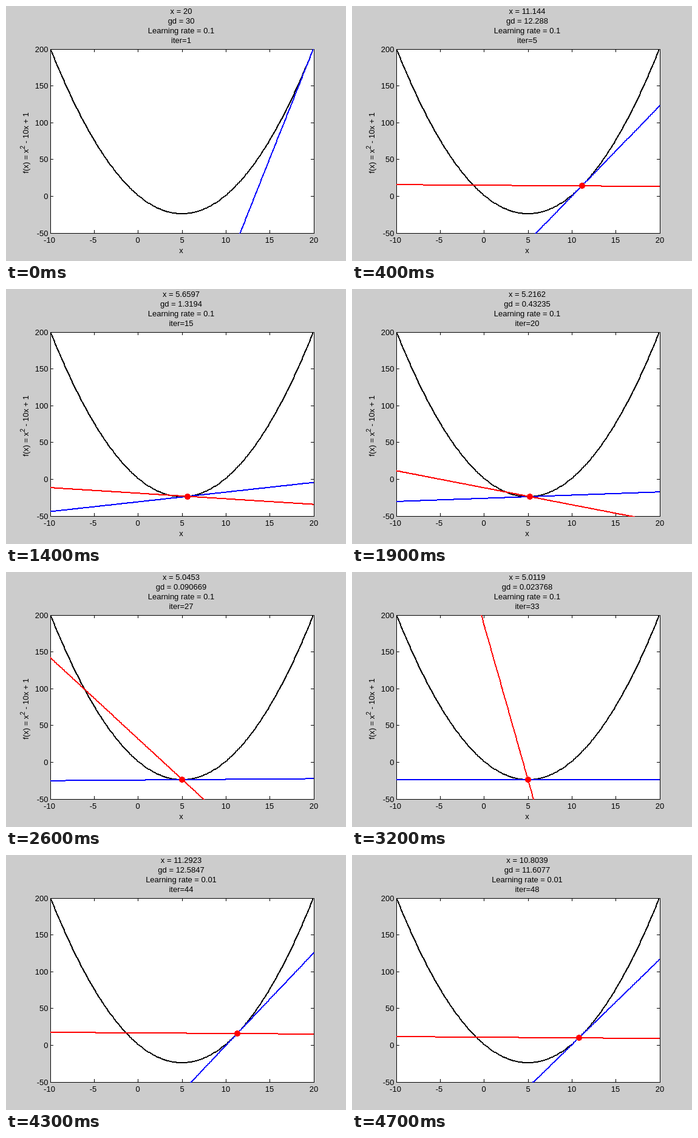
An HTML page for the animation above (4.8 s loop, 560 px wide and 420 px high).

```html
<!DOCTYPE html>
<html lang="en">
<head>
<meta charset="utf-8">
<title>Gradient descent</title>
<style>
  html, body { margin: 0; width: 100%; height: 100%; overflow: hidden; background: #ccc; }
  svg { display: block; width: 560px; height: 420px; }
  text { font: 13px "Liberation Sans", Arial, sans-serif; fill: #000; }
  .mid { text-anchor: middle; }
  .end { text-anchor: end; }
  .sup { font-size: 10.4px; }
  .axes { stroke: #000; stroke-width: 1; fill: none; shape-rendering: crispEdges; }
  .plot { fill: none; stroke-width: 2; stroke-linejoin: round; shape-rendering: crispEdges; }
</style>
</head>
<body>
<svg viewBox="0 0 560 420">
  <defs><clipPath id="area"><rect x="73" y="71" width="435" height="304"/></clipPath></defs>
  <rect width="560" height="420" fill="#ccc"/>
  <rect x="73" y="71" width="435" height="304" fill="#fff"/>
  <path id="axes" class="axes"/>
  <g id="ticks"></g>
  <g id="names">
    <text class="mid" x="288.5" y="407">x</text>
    <text class="mid" transform="translate(37 225.5) rotate(-90)">f(x) = x<tspan class="sup" dy="-6">2</tspan><tspan dy="6"> - 10x + 1</tspan></text>
  </g>
  <g id="title"></g>
  <g class="plot" clip-path="url(#area)">
    <polyline id="curve" stroke="#000"/>
    <polyline id="tangent" stroke="#00f"/>
    <polyline id="normal" stroke="#f00"/>
    <circle id="dot" r="5" fill="#f00"/>
  </g>
</svg>
<script>
const STEP_MS = 100, STEPS = 48, FIRST_RUN = 43, START = 20;
const LEFT = 72.8, RIGHT = 506.8, TOP = 70.55, BOTTOM = 373.55, TICK = 4.34;
const $ = id => document.getElementById(id);

// Everything in the plot lands on whole pixels.
const px = x => Math.round(LEFT + (x + 10) * (RIGHT - LEFT) / 30);
const py = y => Math.round(BOTTOM - (y + 50) * (BOTTOM - TOP) / 250);
const f = x => x * x - 10 * x + 1;

function addText(parent, cls, x, y, value = '') {
  const el = document.createElementNS('http://www.w3.org/2000/svg', 'text');
  el.setAttribute('class', cls);
  el.setAttribute('x', x);
  el.setAttribute('y', y);
  el.textContent = value;
  parent.append(el);
  return el;
}

function plot(el, fn) {
  const pts = [];
  for (let i = 0; i <= 300; i++) {
    const x = -10 + i / 10;
    pts.push(px(x) + ',' + py(fn(x)));
  }
  el.setAttribute('points', pts.join(' '));
}

function drawAxes() {
  const [l, r, t, b] = [px(-10), px(20), py(200), py(-50)];
  const near = v => Math.round(v + TICK) + 1;
  const far = v => Math.round(v - TICK);
  let d = `M${l + .5} ${t + .5}H${r + .5}V${b + .5}H${l + .5}Z`;
  for (let x = -10; x <= 20; x += 5) {
    const sx = px(x) + .5;
    d += `M${sx} ${t}V${near(TOP)}M${sx} ${b + 1}V${far(BOTTOM)}`;
    addText($('ticks'), 'mid', px(x) - (x < 0 ? 1.5 : 0), 390, x);
  }
  for (let y = -50; y <= 200; y += 50) {
    const sy = py(y) + .5;
    d += `M${l} ${sy}H${near(LEFT)}M${r + 1} ${sy}H${far(RIGHT)}`;
    addText($('ticks'), 'end', 69.5, py(y) + 5, y);
  }
  $('axes').setAttribute('d', d);
}

// Four decimals for values of one or more, five digits below.
function format(v) {
  const digits = Math.max(Math.floor(Math.log10(Math.abs(v))), 0) + 5;
  return String(+v.toPrecision(digits));
}

const lines = [13, 29, 45, 61].map(y => addText($('title'), 'mid', 288.5, y));

function show(step) {
  const first = step < FIRST_RUN;
  const rate = first ? 0.1 : 0.01;
  const x = 5 + (START - 5) * (1 - 2 * rate) ** step;
  const slope = 2 * x - 10, y = f(x);
  [`x = ${format(x)}`, `gd = ${format(slope)}`, `Learning rate = ${rate}`, `iter=${step + 1}`]
    .forEach((s, i) => lines[i].textContent = s);
  plot($('tangent'), t => y + slope * (t - x));
  plot($('normal'), t => y - (t - x) / slope);
  $('dot').setAttribute('cx', px(x));
  $('dot').setAttribute('cy', py(y));
  // Points outside the axes carry no marker.
  $('dot').style.display = y > 200 ? 'none' : '';
  // The second run has no axis names.
  $('names').style.display = first ? '' : 'none';
}

drawAxes();
plot($('curve'), f);
let shown = 0;
show(0);
const begin = performance.now();

function tick() {
  const step = Math.floor((performance.now() - begin) / STEP_MS) % STEPS;
  if (step !== shown) show(shown = step);
  requestAnimationFrame(tick);
}
requestAnimationFrame(tick);
</script>
</body>
</html>
```
